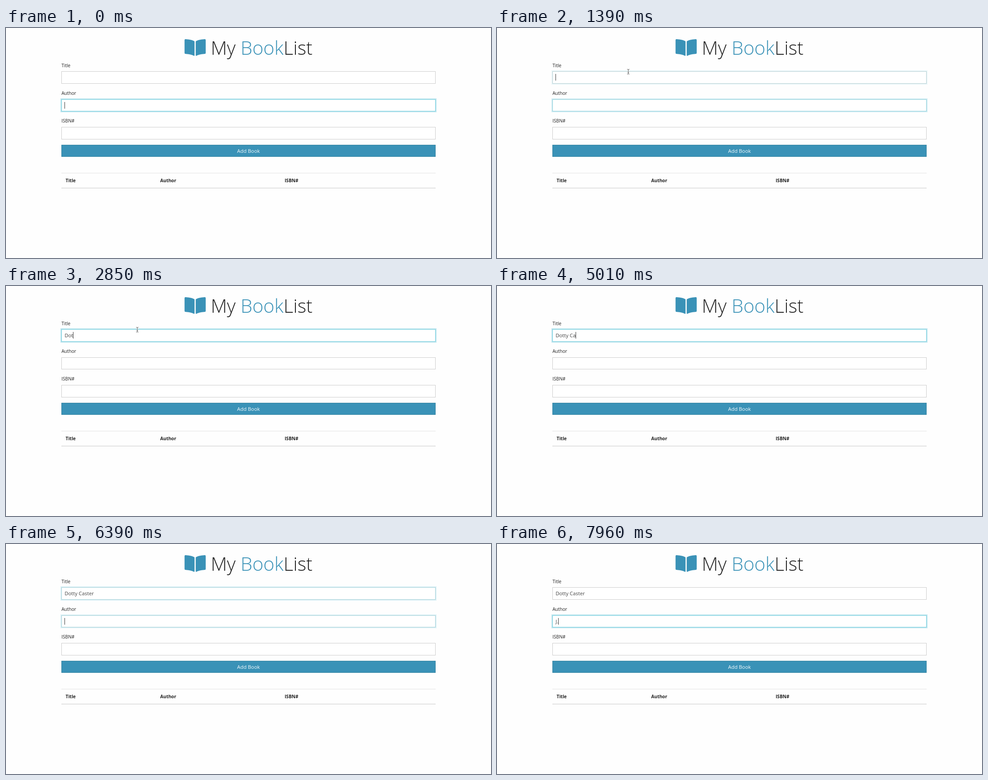
Recreate the animation shown at these times as an HTML page with a canvas. Size 1086 px wide and 516 px high, loop 8 s.

```html
<!DOCTYPE html>
<html lang="en">
<head>
<meta charset="utf-8">
<title>My BookList</title>
<style>
  html, body { margin: 0; width: 100%; height: 100%; overflow: hidden; background: #fefefe; }
  canvas, svg { position: absolute; left: 0; top: 0; width: 1086px; height: 516px; }
  text { font-family: "Open Sans", sans-serif; fill: #222; white-space: pre; }
  .heading { font-size: 42.2px; font-weight: 300; }
  .heading tspan { fill: #3a92b7; }
  .label { font-size: 10.18px; }
  .head { font-size: 10.18px; font-weight: 700; }
  .button { font-size: 11.31px; font-weight: 400; fill: #f4fafc; }
  .value { font-size: 11.31px; fill: #444; }
</style>
</head>
<body>
<canvas id="stage" width="1086" height="516"></canvas>
<svg viewBox="0 0 1086 516">
  <text class="heading" x="686.5" y="60" text-anchor="end">My <tspan>Book</tspan>List</text>
  <text class="label" x="124.2" y="87.6">Title</text>
  <text class="label" x="124.2" y="150.2">Author</text>
  <text class="label" x="124.2" y="212.2">ISBN#</text>
  <text class="button" x="543" y="279.7" text-anchor="middle">Add Book</text>
  <text class="head" x="133.5" y="345.6">Title</text>
  <text class="head" x="345.3" y="345.6">Author</text>
  <text class="head" x="624" y="345.6">ISBN#</text>
  <text class="value" id="title" x="131.2" y="115.4"></text>
  <text class="value" id="author" x="131.2" y="177.6"></text>
</svg>
<script>
const LOOP = 8000;
const ctx = document.getElementById('stage').getContext('2d');
const BLUE = '#3a92b7';

const fields = {
  title: {
    y: 97, h: 28, caretY: 103, text: 'Dotty Caster',
    keys: [2370, 2450, 2850, 3040, 3830, 4420, 4710, 5010, 5500, 5690, 5880, 5980]
  },
  author: { y: 160, h: 27, caretY: 166, text: 'J.', keys: [7460, 7960] }
};

// Moments at which the caret disappears and comes back
const blinks = [[300, 800], [1770, 2280], [3530, 3830], [4320, 4420], [6770, 7260]];
const TO_TITLE = 1270, TO_AUTHOR = 6280;

// Pointer stops before it settles on the title field
const sweep = [[630, 50], [560, 135], [455, 218], [365, 264], [318, 236], [300, 196]];

const clamp = v => Math.max(0, Math.min(1, v));
const mix = (a, b, k) => a + (b - a) * k;

function typed(field, t) {
  return field.text.slice(0, field.keys.filter(k => t >= k).length);
}

// Share of the focus ring on the title field
function titleFocus(t) {
  if (t < TO_TITLE + 100) return 0;
  if (t < TO_AUTHOR) return t < 1470 ? 0.28 : 1;
  if (t < 6380) return 1;
  return t < 6470 ? 0.5 : 0;
}

function drawField({ y, h }, focus) {
  if (focus > 0) {
    ctx.fillStyle = `rgba(92,190,212,${0.4 * focus})`;
    ctx.fillRect(122, y - 2, 842, h + 4);
  }
  ctx.fillStyle = '#fff';
  ctx.fillRect(124, y, 838, h);
  const shade = [[204, 116], [204, 207], [204, 222]].map(([a, b]) => Math.round(mix(a, b, focus)));
  ctx.strokeStyle = `rgb(${shade})`;
  ctx.lineWidth = 1;
  ctx.strokeRect(124.5, y + 0.5, 837, h - 1);
}

function drawPage(mirror) {
  ctx.save();
  ctx.translate(423.5, 0);
  ctx.scale(mirror ? -1 : 1, 1);
  ctx.fillStyle = BLUE;
  ctx.fill(new Path2D('M-1.9 29.6C-7 26.6 -16 25.4 -21.5 25.1Q-23.7 25 -23.7 27.2' +
    'V56Q-23.7 57.9 -21.8 58C-16 58.3 -8 59.5 -3 62.3Q-1.3 63 -1.3 61.3V30.8Q-1.3 30 -1.9 29.6Z'));
  ctx.restore();
}

function drawBeam(x, y) {
  const shape = new Path2D('M-2.5 -5.5Q0 -5.5 0 -4V4Q0 5.5 -2.5 5.5M2.5 -5.5Q0 -5.5 0 -4M0 4Q0 5.5 2.5 5.5M-1.5 1.5H1.5');
  ctx.save();
  ctx.translate(x, y);
  ctx.strokeStyle = '#fff';
  ctx.lineWidth = 2.4;
  ctx.stroke(shape);
  ctx.strokeStyle = '#555';
  ctx.lineWidth = 1;
  ctx.stroke(shape);
  ctx.restore();
}

function drawArrow(x, y) {
  const shape = new Path2D('M0 0V11.2L2.6 8.8L4.4 12.8L6.2 12L4.5 8.2H8Z');
  ctx.save();
  ctx.translate(x, y);
  ctx.fillStyle = '#111';
  ctx.fill(shape);
  ctx.strokeStyle = '#fff';
  ctx.lineWidth = 0.9;
  ctx.stroke(shape);
  ctx.restore();
}

function drawPointer(t) {
  if (t < 160 || t >= 3130) return;
  let [x, y] = sweep[Math.min(5, Math.floor((t - 160) / 86))];
  if (t >= 800) {
    const k = clamp((Math.floor((t - 800) / 95) + 1) / 5);
    const ease = 1 - (1 - k) ** 2;
    x = mix(x, 294, ease);
    y = mix(y, 98, ease);
  }
  const inField = Object.values(fields).some(f => y >= f.y && y <= f.y + f.h);
  (inField ? drawBeam : drawArrow)(x, y);
}

function drawCaret(t) {
  if (blinks.some(([off, on]) => t >= off && t < on)) return;
  const field = t >= TO_TITLE && t < TO_AUTHOR ? fields.title : fields.author;
  ctx.font = '11.31px "Open Sans", sans-serif';
  const x = Math.floor(131.2 + ctx.measureText(typed(field, t)).width);
  ctx.fillStyle = '#333';
  ctx.fillRect(x, field.caretY, 1, 15);
}

function draw(t) {
  ctx.fillStyle = '#fefefe';
  ctx.fillRect(0, 0, 1086, 516);
  drawPage(false);
  drawPage(true);

  const focus = titleFocus(t);
  drawField(fields.title, focus);
  drawField(fields.author, 1 - focus);
  // The ring leaves the title before it reaches the next field
  drawField({ y: 222, h: 28 }, 0);

  ctx.fillStyle = BLUE;
  ctx.fillRect(124, 262, 838, 27);
  ctx.strokeStyle = '#33829f';
  ctx.strokeRect(124.5, 262.5, 837, 26);

  ctx.fillStyle = '#e2e2e2';
  ctx.fillRect(124, 325, 838, 1);
  ctx.fillStyle = '#d8d8d8';
  ctx.fillRect(124, 358.4, 838, 1.5);

  for (const id in fields) {
    document.getElementById(id).textContent = typed(fields[id], t);
  }
  drawCaret(t);
  drawPointer(t);
}

let start;
function tick(now) {
  start ??= now;
  draw((now - start) % LOOP);
  requestAnimationFrame(tick);
}
requestAnimationFrame(tick);
</script>
</body>
</html>
```
